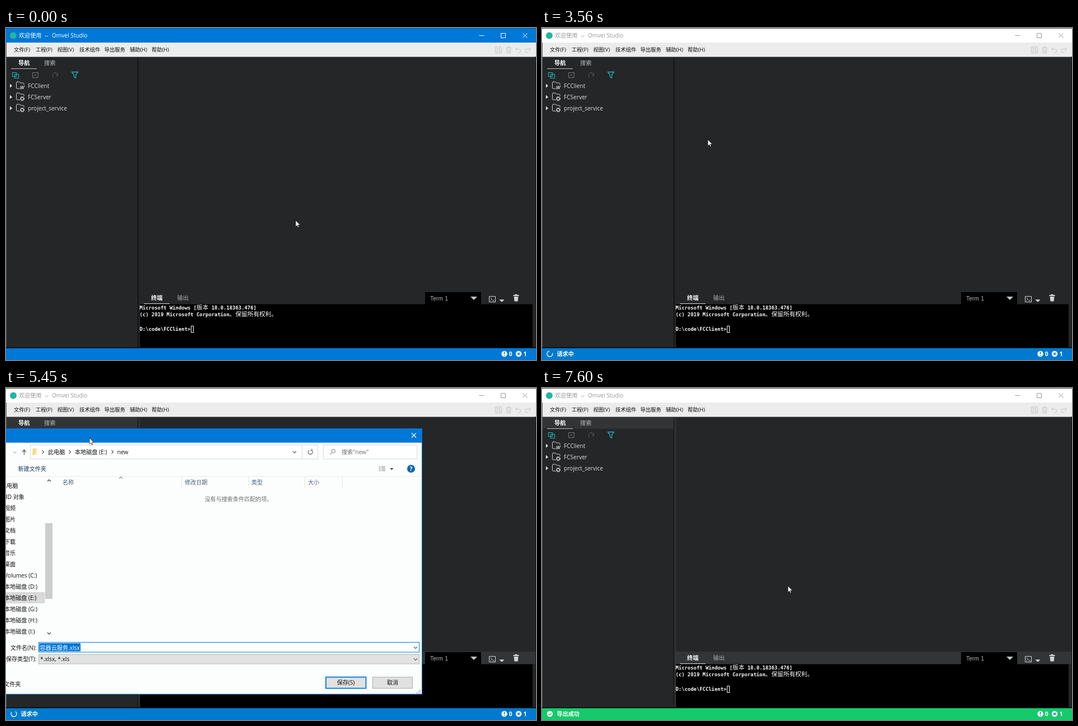
Recreate the animation shown at these times as an HTML page. Size 946 by 592 pixels, loop 8000 ms.

```html
<!DOCTYPE html>
<html lang="zh-CN">
<head>
<meta charset="utf-8">
<title>Export demo</title>
<style>
  html, body { margin: 0; width: 100%; height: 100%; overflow: hidden; background: #242628; }
  svg { display: block; width: 100vw; height: 100vh; }
  text { font-family: "Open Sans", "Noto Sans CJK SC", "Noto Sans CJK", sans-serif; white-space: pre; }
  .mono { font: bold 8.88px "DejaVu Sans Mono", monospace; }
  .wide { font: 10.66px "Noto Sans CJK SC", "Noto Sans CJK", sans-serif; }
</style>
</head>
<body>
<svg id="stage" viewBox="0 0 946 592"></svg>
<script>
const LOOP = 8000;
const BLUE = '#0078d7', TEAL = '#1cb0b4', PALE = '#d4d4d4';

// Drawing helpers
const text = (x, y, s, size = 10.1, fill = '#111', more = '') =>
  `<text x="${x}" y="${y}" font-size="${size}" fill="${fill}" ${more}>${s}</text>`;
const rect = (x, y, w, h, fill, more = '') =>
  `<rect x="${x}" y="${y}" width="${w}" height="${h}" fill="${fill}" ${more}/>`;
const frame = (x, y, w, h, fill, stroke, line = 1) =>
  rect(x + line / 2, y + line / 2, w - line, h - line, fill, `stroke="${stroke}" stroke-width="${line}"`);
const line = (d, stroke, width = 1, more = '') =>
  `<path d="${d}" fill="none" stroke="${stroke}" stroke-width="${width}" ${more}/>`;
const shape = (d, fill, more = '') => `<path d="${d}" fill="${fill}" ${more}/>`;
const circle = (x, y, r, fill) => `<circle cx="${x}" cy="${y}" r="${r}" fill="${fill}"/>`;
const group = (id, body) => `<g id="${id}">${body}</g>`;
const down = (x, y, w, fill) => shape(`M${x - w} ${y - w / 2}h${2 * w}l${-w} ${w}z`, fill);
const chevron = (x, y, turn, stroke = '#555') =>
  line('M-3-1.5L0 1.5 3-1.5', stroke, 1.1, `transform="translate(${x} ${y}) rotate(${turn})"`);

function titleBar() {
  return rect(0, 0, 946, 26, BLUE, 'id="titleBack"') + rect(0, 0, 946, 1, '#0b5c9e', 'id="titleEdge"') +
    circle(13, 13.5, 6, '#25b79b') +
    `<g id="titleText" fill="#fff" stroke="none">` +
    text(23, 17.3, '欢迎使用', 10.1, 'inherit') + text(69, 17.3, '--', 10.1, 'inherit') +
    text(82, 17.3, 'Omvel Studio', 10.1, 'inherit') + '</g>' +
    `<g id="titleButtons" stroke="#fff">` +
    '<path d="M844.500 13.500h9M883.500 9.500h8v8h-8zM922.500 9.500l8 8m0-8l-8 8" fill="none"/></g>';
}

function menuBar() {
  const items = [[14, '文件(F)'], [53, '工程(P)'], [91.5, '视图(V)'], [131, '技术组件'],
    [175.5, '导出服务'], [221, '辅助(H)'], [260, '帮助(H)']];
  const grey = '#c6c6c6';
  return rect(0, 26, 946, 25.5, '#ececec') +
    items.map(([x, s]) => text(x, 41.6, s, 9.3)).join('') +
    line('M873.500 33.500h9l2 2v9h-11zM876 33.500v4h6v-4M876 44.500v-4h6v4', grey) +
    line('M892 35.500h10M895.500 35v-1.500h3V35M893.500 36v8.500h7V36M896 38v5M898.500 38v5', grey) +
    line('M913 34.500l-3.500 3 3.500 3M910 37.500h6q3 0 3 3t-3 3.500h-2', grey) +
    line('M933 34.500l3.500 3-3.500 3M936 37.500h-6q-3 0-3 3t3 3.500h2', grey);
}

function treeRow(y, name, mark) {
  const badge = mark === 'W'
    ? text(25, y + 6, 'W', 8.5, PALE, 'font-weight="bold" font-style="italic"')
    : circle(29, y + 3.5, 4.6, '#242628') +
      `<circle cx="29" cy="${y + 3.5}" r="3" fill="none" stroke="${PALE}" stroke-width="2" stroke-dasharray="1.500 .85"/>` +
      `<circle cx="29" cy="${y + 3.5}" r="2.500" fill="none" stroke="${PALE}"/>`;
  return shape(`M7 ${y - 3}l4 3.500-4 3.500z`, '#e4e4e4') +
    line(`M25 ${y + 5.5}h-5q-1.500 0-1.500-1.500v-9q0-1.500 1.500-1.500h4l2 2h4.500q1.500 0 1.500 1.500v2`, PALE) +
    badge + text(39, y + 4, name, 10.1, '#dcdcdc');
}

function sidebar() {
  return group('strips', rect(1, 52, 234, 20.5, '#323436') + rect(238, 470, 708, 22.5, '#323436') +
      rect(236, 52, 2.5, 518, '#393b3d')) +
    rect(235, 52, 1.2, 518, '#08090a') +
    text(22, 65.6, '导航', 10.3, '#fff', 'font-weight="bold"') + text(68, 65.6, '搜索', 10.3, '#bbb') +
    rect(9, 72, 46, 1, '#b5c4bd') +
    line('M11.500 79.500h7v7h-7zM15.500 82.500h7v7h-7z', TEAL, 1.2) +
    line('M47.500 79.500h10v9h-10zM50 84h5', '#777') +
    line('M86 88.500a4.500 4.500 0 1 1 6-3M92 81v4h-3', '#5c5e60') +
    line('M117.500 78.500h11l-4 5.500v5l-3-1.500V84z', TEAL, 1.3) +
    treeRow(102.5, 'FCClient', 'W') + treeRow(122.5, 'FCServer') + treeRow(142.5, 'project_service');
}

function terminal() {
  const mono = (y, s) => `<text class="mono" x="238.500" y="${y}" fill="#fff">${s}</text>`;
  const wide = s => `<tspan class="wide">${s}</tspan>`;
  return rect(239, 492.5, 701, 77.5, '#000') +
    text(259, 484.7, '终端', 10.3, '#fff', 'font-weight="bold"') + text(305.5, 484.7, '输出', 10.3, '#aaa') +
    rect(246, 491, 46, 1, '#cfd8d0') +
    rect(748, 471, 100, 22, '#000') +
    text(757, 486, 'Term 1', 10.5, '#b4b4b4', 'style="font-family:\'Liberation Sans\',sans-serif"') +
    down(835, 482, 6, '#c4c4c4') +
    line('M862.500 478.500h11v10h-11zM865 481l2.500 2.500-2.500 2.500M868.500 486h3', PALE) + down(885, 486.5, 4.6, PALE) +
    shape('M905.500 476h10v2h-10zM908.500 474.800h4v1.500h-4zM906.500 479h8l-1 8.500h-6z', PALE) +
    mono(501.7, `Microsoft Windows [${wide('版本')} 10.0.18363.476]`) +
    mono(514.4, `(c) 2019 Microsoft Corporation${wide('。保留所有权利。')}`) +
    mono(540, 'D:\\code\\FCClient&gt;') + frame(330, 531, 5, 12.5, 'none', '#fff');
}

function statusBar() {
  const bold = 'font-weight="bold"';
  return rect(0, 569.5, 946, 1.5, '#08090a') + rect(0, 571, 946, 21, BLUE, 'id="status"') +
    group('busy', line('M3.500 -3.500A5 5 0 1 0 3.500 3.500', '#fff', 1.3, 'id="spinner"') +
      text(26.5, 584.5, '请求中', 10.1, '#fff', bold)) +
    group('done', circle(14, 581, 5.2, '#fff') + line('M11.500 581l2 2 3.300-3.500', '#16c96a', 1.4) +
      text(26.5, 584.5, '导出成功', 10.1, '#fff', bold)) +
    circle(889.5, 581, 5.2, '#fff') + line('M889.500 577.500v4.200m0 1.300v1.500', BLUE, 1.6) +
    text(897.5, 585, '0', 10.8, '#fff', bold) +
    circle(915, 581, 5.2, '#fff') + line('M913 579l4 4m0-4l-4 4', BLUE, 1.5) +
    text(923.5, 585, '1', 10.8, '#fff', bold);
}

function exportMenu() {
  return rect(171, 51.5, 167, 49.5, '#fff', 'rx="1"') + rect(171, 51.5, 167, 24.5, '#519496', 'id="menuHover"') +
    text(188.5, 66.6, '导出已发布服务', 9.25) + text(188.5, 91.4, '导出本地服务', 9.25);
}

function placeIcon(kind, x, y) {
  const box = (fill, inner = '') => rect(x + 1, y - 5, 10, 10, fill) + inner;
  switch (kind) {
    case 'pc': return shape(`M${x} ${y - 4}l8 1.500v5.500l-8-1.500z`, '#2f9fe0') + rect(x + 4, y + 3, 8, 2, '#8ca4b4');
    case 'cube': return shape(`M${x} ${y - 3}l6-2.500 6 2.500v7l-6 2.500-6-2.500z`, '#28a8d0') +
      shape(`M${x} ${y - 3}l6 2v7.500l-6-2.500z`, '#7bdcf0');
    case 'film': return box('#3c4046', rect(x + 3.5, y - 4, 5, 3.6, '#6fb4e0') + rect(x + 3.5, y + 0.6, 5, 3.6, '#c59a54'));
    case 'image': return frame(x, y - 4, 12, 9, '#d4ecfa', '#8a9aa8') + shape(`M${x + 1} ${y + 4}v-3l4-2 6 3v2z`, '#35699c');
    case 'doc': return frame(x + 1.5, y - 6, 9, 11, '#eef4f8', '#7f95a5') +
      line(`M${x + 4} ${y - 3}h5m-5 2h5m-5 2h5m-5 2h5`, '#5a9ac8');
    case 'down': return shape(`M${x + 4} ${y - 5}h4v5h4l-6 6-6-6h4z`, '#2a86dc');
    case 'note': return circle(x + 4, y + 3, 2.4, '#1e8ee0') + line(`M${x + 5.7} ${y + 3}v-8q0 2 3.500 4v2`, '#1e8ee0', 1.5);
    case 'desk': return rect(x, y - 4, 12, 9, '#0d86d8') + rect(x, y + 3, 12, 2, '#0b5fa8');
    default: return shape(`M${x} ${y + 2}l3-2h7l2 2v3l-6 1-6-1.500z`, '#b9bcc0') + shape(`M${x} ${y + 2.5}l6 1.200 6-1.200V5l0 0`, 'none') +
      shape(`M${x} ${y + 3}l6 1 6-1v1.800l-6 1.200-6-1.200z`, '#5d6166') +
      (kind === 'system' ? rect(x, y - 5, 5, 5, '#1c97e4') : '');
  }
}

function dialog() {
  const places = [['pc', '此电脑'], ['cube', '3D 对象'], ['film', '视频'], ['image', '图片'], ['doc', '文档'],
    ['down', '下载'], ['note', '音乐'], ['desk', '桌面'], ['system', 'Volumes (C:)'],
    ...[...'DEGHI'].map(d => ['disk', `本地磁盘 (${d}:)`])];
  const rows = places.map(([kind, name], i) => {
    const y = 156 + 20 * i, inset = i ? 6 : 0;
    return placeIcon(kind, 60 + inset, y) + text(76 + inset, y + 3.9, name);
  }).join('');
  const columns = [[186, '名称', 398], [404, '修改日期', 518], [523, '类型', 618], [624, '大小', 685]]
    .map(([x, s, edge]) => text(x, 153.8, s, 10.1, '#4c607a') + rect(edge, 140, 1, 20, '#e4e4e4')).join('');
  const dots = [[824, 520], [821, 523], [824, 523], [818, 526], [821, 526], [824, 526]]
    .map(([x, y]) => rect(x - 0.5, y - 1, 1.6, 1.6, '#999')).join('');
  const centred = 'text-anchor="middle"', right = 'text-anchor="end"';
  return frame(38, 54, 790, 474.500, '#fcfdfd', BLUE) + rect(38, 54, 790, 25.5, BLUE) +
    text(44.5, 70.8, '另存为', 10.1, '#fff') +
    line('M809 62.500l8 8m0-8l-8 8', '#fff', 1.1, 'id="dialogClose"') +
    line('M60 96.500H50.500l4-4m-4 4l4 4M75 96.500h9.500l-4-4m4 4l-4 4', '#c8c8c8', 1.1) + chevron(100.5, 96.5, 0, '#bbb') +
    line('M117.500 101v-8.500l-3.500 3.500m3.500-3.500l3.500 3.500', '#555', 1.2) +
    frame(128, 83, 514, 26, '#fff', '#d9d9d9') + rect(613, 83, 1, 26, '#d9d9d9') +
    rect(132.5, 90, 7.5, 11, '#f8d775') + rect(136, 92, 4, 9, '#fbe7a5') +
    chevron(151, 96, -90) + text(160, 99.7, '此电脑') + chevron(199, 96, -90) +
    text(208, 99.7, '本地磁盘 (E:)') + chevron(275, 96, -90) + text(283.5, 99.7, 'new') + chevron(600, 96.5, 0) +
    line('M630.500 93a4 4 0 1 1-4.500 0M631 90.500v3h-3', '#666', 1.2) +
    frame(651, 83, 168, 26, '#fff', '#d9d9d9') +
    '<circle cx="669.500" cy="94.500" r="3.200" fill="none" stroke="#777"/>' + line('M667 97l-4 4', '#777') +
    text(684, 99.7, '搜索"new"', 10.1, '#6d6d6d') +
    text(53, 130, '组织', 10.1, '#1e395b') + down(80, 126.5, 2.8, '#333') + text(106.5, 130, '新建文件夹', 10.1, '#1e395b') +
    line('M750.500 122h3m1.500 0h7M750.500 124.500h3m1.500 0h7M750.500 127h3m1.500 0h7M750.500 129.500h3m1.500 0h7', '#8a8a8a') +
    down(773.5, 126.5, 2.8, '#222') + circle(808, 126, 7, '#0b67b2') +
    text(808, 130, '?', 10.5, '#fff', centred + ' font-weight="bold"') +
    rect(39, 139, 788, 1, '#e8eaec') + columns + chevron(290, 142, 180, '#888') +
    text(439.5, 184, '没有与搜索条件匹配的项。', 10.1, '#6d6d6d') +
    rect(39, 346, 115.5, 20, '#d9d9d9') + rows +
    rect(155, 223, 13, 135, '#cdcdcd') + chevron(162, 147, 180, '#333') + chevron(162, 419.5, 0, '#333') +
    text(139.5, 448.6, '文件名(N):', 10.1, '#111', right) + frame(143, 435, 680, 18.5, '#fff', BLUE) +
    rect(144.5, 437, 73.5, 14.5, BLUE) + text(145.5, 448.5, '容器云服务.xlsx', 10.1, '#fff') + chevron(816, 445, 0) +
    text(139.5, 469.4, '保存类型(T):', 10.1, '#111', right) + frame(143, 456.5, 680, 18, '#e2e2e2', '#b4b4b4') +
    text(146, 469.2, '*.xlsx, *.xls') + chevron(816, 466, 0) +
    chevron(52, 510, 180, '#333') + text(61, 513.8, '隐藏文件夹') +
    rect(656, 497.5, 71.5, 20, '#e1e1e1', `id="save" stroke="${BLUE}" stroke-width="1.800"`) +
    text(691.5, 511, '保存(S)', 10.1, '#111', centred) +
    frame(739, 497, 72, 21, '#e1e1e1', '#adadad') + text(775, 511, '取消', 10.1, '#111', centred) + dots;
}

const arrow = shape('M0 0V11.200L2.600 8.900 4.300 12.600 6 11.800 4.400 8.200H8Z', '#fff', 'stroke="#111" stroke-width=".7"');
const hand = shape('M-1.200 9V1Q0-.8 1.200 1V6Q2.500 5 3.300 6.300 4.700 5.600 5.300 7 7 6.600 7 8.500V11.500L5.500 16H0L-4 10.500Q-3.800 8.500-2.500 9.300L-1.200 10.500Z',
  '#fff', 'stroke="#111" stroke-width=".9"');

const stage = document.getElementById('stage');
stage.innerHTML = rect(0, 0, 946, 592, '#242628') + titleBar() + menuBar() + sidebar() + terminal() +
  rect(0, 26, 1, 566, '#5a5e62') + rect(945, 51, 1, 520, '#111') + statusBar() +
  group('menu', exportMenu()) + group('dialog', dialog()) +
  group('pointer', group('arrow', arrow) + group('hand', hand));

// Pointer moves: start, end, number of steps, destination
const MOVES = [
  [150, 410, 3, 263, 165], [680, 1230, 5, 183, 47], [1510, 2050, 5, 205, 64],
  [2470, 3010, 5, 296, 199], [4660, 5450, 7, 149, 89], [5590, 5590, 1, 200, 74],
  [5740, 5740, 1, 234, 71], [5880, 6730, 7, 667, 502], [6860, 7600, 6, 439, 353]];

function pointerAt(t) {
  let x = 517, y = 343;
  for (const [start, end, steps, toX, toY] of MOVES) {
    if (t < start) break;
    const gap = (end - start) / (steps - 1) || 1;
    const part = Math.min(1, (Math.floor((t - start) / gap + 1e-6) + 1) / steps);
    x += (toX - x) * part;
    y += (toY - y) * part;
  }
  return [x, y];
}

const el = id => document.getElementById(id);
const show = (id, on) => el(id).setAttribute('display', on ? 'inline' : 'none');
const set = (id, name, value) => el(id).setAttribute(name, value);

function draw(t) {
  const [x, y] = pointerAt(t);
  const menuOpen = t >= 1510 && t < 2470, overItem = menuOpen && y > 52;
  const blurred = t >= 3560, done = t >= 7300;
  const [dx, dy] = t < 5590 ? [-85, 18] : t < 5740 ? [-34, 3] : [0, 0];
  const overSave = x > 655 && y > 497;

  set('titleBack', 'fill', blurred ? '#fff' : BLUE);
  set('titleEdge', 'fill', blurred ? '#45484b' : '#0b5c9e');
  set('titleText', 'fill', blurred ? '#999' : '#fff');
  set('titleButtons', 'stroke', blurred ? '#999' : '#fff');
  show('strips', t >= 3700);

  show('menu', menuOpen);
  show('menuHover', overItem);

  show('dialog', t >= 3700 && t < 6860);
  set('dialog', 'transform', `translate(${dx} ${dy})`);
  show('dialogClose', t < 5590);
  set('save', 'fill', overSave ? '#cce4f7' : '#e1e1e1');
  set('save', 'stroke-width', overSave ? 1 : 1.8);

  set('status', 'fill', done ? '#16c96a' : t >= 2600 ? '#007acf' : BLUE);
  show('busy', t >= 2600 && !done);
  show('done', done);
  set('spinner', 'transform', `translate(14 581) rotate(${0.36 * t + 98})`);

  set('pointer', 'transform', `translate(${x} ${y})`);
  show('arrow', !overItem);
  show('hand', overItem);
}

const begin = performance.now();
function tick() {
  draw((performance.now() - begin) % LOOP);
  requestAnimationFrame(tick);
}
tick();
</script>
</body>
</html>
```
